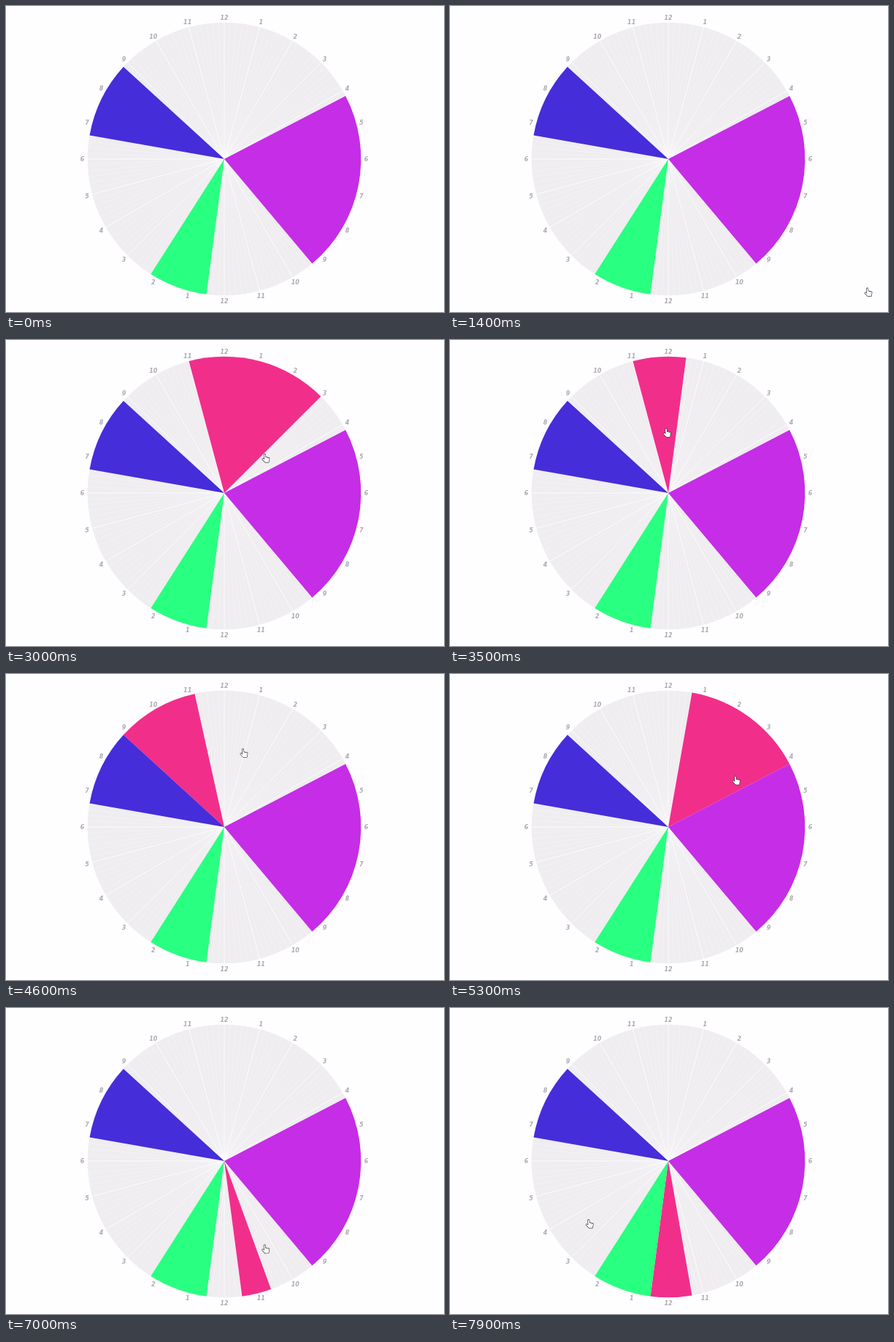
An HTML page with a canvas for the animation above (8000 ms loop, 600 by 420 pixels).

```html
<!DOCTYPE html>
<html lang="en">
<head>
<meta charset="utf-8">
<title>Day dial</title>
<style>
  html, body { margin: 0; width: 100%; height: 100%; overflow: hidden; background: #fefdff; }
  canvas { display: block; width: 600px; height: 420px; }
</style>
</head>
<body>
<canvas id="stage" width="600" height="420"></canvas>
<script>
const ctx = document.getElementById('stage').getContext('2d');
const LOOP = 8000, FRAME = 100, LAG = 60;
const CX = 299, CY = 210, RADIUS = 187.3, LABEL_RADIUS = 194.5, STEP = 2.5;

const blocks = [
  { from: 62.5, to: 140, color: '#c62de6' },
  { from: 187.5, to: 212.5, color: '#29ff80' },
  { from: 280, to: 312.5, color: '#452dd9' }
];

const drags = [
  { begin: 2500, end: 4100, anchor: -15 },
  { begin: 4700, end: 5100, anchor: 10 },
  { begin: 5400, end: 6200, anchor: 45 },
  { begin: 6900, end: LOOP, anchor: 170 }
];

// The pointer swings around the hub and eases between these turning points.
const turns = [
  { time: 1400, angle: 123, radius: 325 },
  { time: 2100, angle: -13.3, radius: 115 },
  { time: 2400, angle: -13.3, radius: 115 },
  { time: 3000, angle: 46, radius: 77 },
  { time: 4000, angle: -50, radius: 100 },
  { time: 5107, angle: 62, radius: 118 },
  { time: 6150, angle: -50, radius: 84 },
  { time: 6800, angle: -188.5, radius: 119 },
  { time: 7250, angle: -230, radius: 140 },
  { time: LOOP, angle: -121.7, radius: 135.5 }
];

const radians = deg => (deg - 90) * Math.PI / 180;
const mix = (a, b, u) => a + (b - a) * u;
const easeInOut = u => (1 - Math.cos(Math.PI * u)) / 2;

function polar(deg, r) {
  return [CX + r * Math.cos(radians(deg)), CY + r * Math.sin(radians(deg))];
}

function pointerAt(t) {
  const next = turns.findIndex(turn => turn.time > t);
  const a = turns[next - 1], b = turns[next];
  const u = easeInOut((t - a.time) / (b.time - a.time));
  return { angle: mix(a.angle, b.angle, u), radius: mix(a.radius, b.radius, u) };
}

// Free space around an angle, between the neighbouring blocks.
function gapAround(angle) {
  const turnsOf = deg => [deg - 360, deg];
  return {
    low: Math.max(...blocks.flatMap(b => turnsOf(b.to)).filter(deg => deg <= angle)),
    high: Math.min(...blocks.flatMap(b => turnsOf(b.from)).filter(deg => deg > angle))
  };
}

// A selection spans from its anchor cell to the pointer's cell.
function selectionAt(t) {
  const drag = drags.filter(d => d.begin <= t).pop();
  if (!drag) return null;
  const { anchor } = drag, { low, high } = gapAround(anchor);
  let { angle } = pointerAt(Math.min(t, drag.end) - LAG);
  angle += 360 * Math.round((anchor - angle) / 360);
  const cell = Math.floor(angle / STEP) * STEP;
  return {
    from: Math.max(low, Math.min(anchor, cell)),
    to: Math.min(high, Math.max(anchor, cell) + STEP),
    color: '#f22e8b'
  };
}

function drawWedge({ from, to, color }) {
  ctx.fillStyle = color;
  ctx.beginPath();
  ctx.moveTo(CX, CY);
  ctx.arc(CX, CY, RADIUS, radians(from), radians(to));
  ctx.fill();
}

function drawSpokes(step, alpha) {
  ctx.strokeStyle = `rgba(255,255,255,${alpha})`;
  ctx.lineWidth = 1;
  ctx.beginPath();
  for (let deg = 0; deg < 360; deg += step) {
    ctx.moveTo(CX, CY);
    ctx.lineTo(...polar(deg, RADIUS));
  }
  ctx.stroke();
}

function drawDial() {
  ctx.fillStyle = '#fefdff';
  ctx.fillRect(0, 0, 600, 420);
  drawWedge({ from: 0, to: 360, color: '#efedf0' });
  drawSpokes(STEP, 0.22);
  drawSpokes(15, 0.7);

  ctx.fillStyle = '#aeabb0';
  ctx.font = 'italic bold 8px "DejaVu Sans", sans-serif';
  ctx.textAlign = 'center';
  for (let hour = 0; hour < 24; hour++) {
    const [x, y] = polar(hour * 15, LABEL_RADIUS);
    ctx.fillText(hour % 12 || 12, x, y + 3.3);
  }
}

// Round strokes form the hand: a wide dark pass, then a narrow white one.
function drawHand({ angle, radius }) {
  const [x, y] = polar(angle, radius);
  ctx.save();
  ctx.translate(x, y);
  ctx.lineCap = ctx.lineJoin = 'round';
  ctx.beginPath();
  ctx.moveTo(0, 1);
  ctx.lineTo(0.6, 9);
  for (let finger = 1; finger < 4; finger++) {
    ctx.moveTo(finger * 1.8, 4.8 + finger * 0.4);
    ctx.lineTo(0.8 + finger * 1.3, 10.5);
  }
  ctx.moveTo(-2.4, 7);
  ctx.lineTo(1, 10.5);
  for (const [width, color] of [[3, '#333'], [1.7, '#fff']]) {
    ctx.lineWidth = width;
    ctx.strokeStyle = color;
    ctx.stroke();
  }
  ctx.restore();
}

function render(now) {
  const t = Math.floor((now % LOOP) / FRAME) * FRAME;
  drawDial();
  const selection = selectionAt(t);
  if (selection) drawWedge(selection);
  blocks.forEach(drawWedge);
  if (t >= turns[0].time) drawHand(pointerAt(t));
}

let start;
function tick(now) {
  start ??= now;
  render(Math.max(0, now - start));
  requestAnimationFrame(tick);
}
render(0);
requestAnimationFrame(tick);
</script>
</body>
</html>
```
